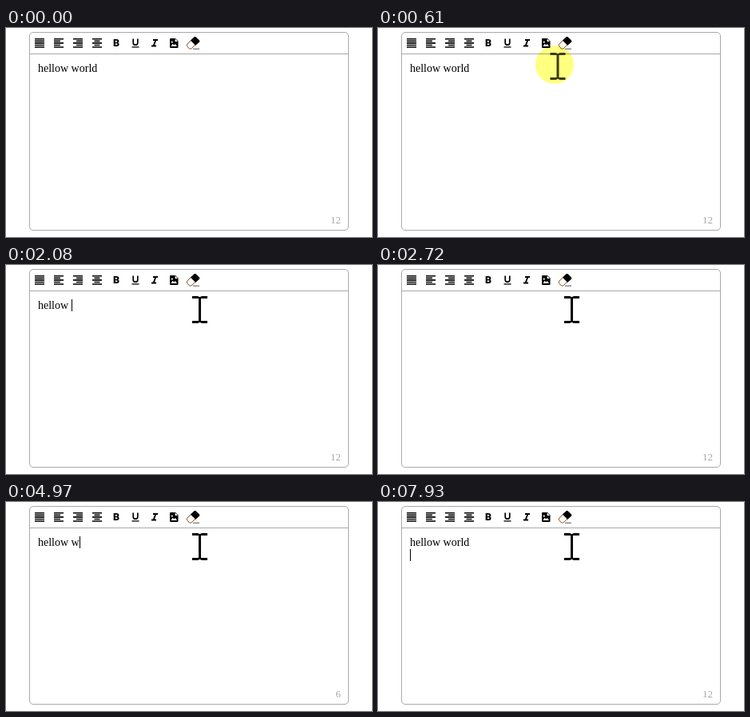
Write an HTML page that moves like this. It is 458 px wide and 262 px high and loops after 8 s.

```html
<!DOCTYPE html>
<html lang="en">
<head>
<meta charset="utf-8">
<title>Text editor</title>
<style>
  html, body { margin: 0; width: 100%; height: 100%; overflow: hidden; background: #fff; }
  svg { display: block; }
  text { white-space: pre; }
  .serif { font-family: "Liberation Serif", "Times New Roman", serif; }
  #highlight { mix-blend-mode: multiply; }
</style>
</head>
<body>
<svg width="458" height="262" viewBox="0 0 458 262">
  <rect x="29.5" y="5.5" width="399" height="248" rx="4.5" fill="#fff" stroke="#a9a9a9"/>
  <path d="M30 32.5H428" stroke="#a9a9a9"/>

  <g id="aligns" stroke="#000" stroke-width="1.6"></g>

  <text x="138" y="23" font-family="Roboto, sans-serif" font-weight="900" font-size="12.5" text-anchor="middle">B</text>
  <g fill="none" stroke="#000">
    <path d="M159.2 13.5V18.4a2.8 2.8 0 0 0 5.6 0V13.5" stroke-width="1.7"/>
    <path d="M157.5 23.9H166.5" stroke-width="1.3"/>
    <path d="M184 15H190M182 22.5H188M187.4 15L184.6 22.5" stroke-width="1.9"/>
  </g>

  <path d="M206 13H212L215.5 16.5V24a1 1 0 0 1-1 1H206a1 1 0 0 1-1-1V14a1 1 0 0 1 1-1Z"/>
  <path d="M211.6 13.6V17H215M206.5 23L208.6 19.8L210.4 21.6L211.8 20L214 23Z" fill="#fff"/>
  <circle cx="207.8" cy="17.6" r="1.1" fill="#fff"/>

  <g stroke-linejoin="round">
    <path d="M231.5 15.5L237 21L231.8 26H229.5L226.5 22.6V20.5Z" fill="#fff" stroke="#8a4a1c"/>
    <path d="M231.3 15.6L235.8 11.6H237.4L241.8 15.8V17.3L237.2 21.3Z" stroke="#000"/>
    <path d="M234 26.2H242" stroke="#555"/>
  </g>

  <text id="line" class="serif" x="40" y="55" font-size="14"></text>
  <rect id="caret" width="1" height="15"/>
  <text id="count" class="serif" x="419" y="245" font-size="13" fill="#a9a9a9" text-anchor="end"></text>

  <path id="cursor" d="M-9.5-17H-2.5L0-15.8L2.5-17H9.5V-14H1.5V14H9.5V17H2.5L0 15.8L-2.5 17H-9.5V14H-1.5V-14H-9.5Z"/>
  <circle id="highlight" r="24" fill="#ffff80"/>
</svg>
<script>
const LOOP = 8000;
const FULL = "hellow world";
const $ = id => document.getElementById(id);

// time, text, counter, caret line (0 = hidden)
const typing = [
  [0, FULL, 12, 0], [700, FULL, 12, 1], [1160, FULL, 12, 0],
  [1540, "hellow worl", 12, 0], [1700, "hellow worl", 12, 1],
  [2000, "hellow wo", 12, 1], [2080, "hellow ", 12, 1], [2160, "hello", 12, 1],
  [2240, "he", 12, 1], [2320, "", 12, 1], [2720, "", 12, 0],
  [2950, "h", 12, 0], [3030, "h", 1, 0], [3100, "he", 2, 0],
  [3250, "hel", 2, 1], [3330, "hel", 3, 1], [3420, "hell", 4, 1],
  [3570, "hello", 5, 1], [3660, "hellow", 6, 1], [3810, "hellow", 6, 0],
  [4360, "hellow o", 6, 0], [4440, "hellow o", 8, 0], [4740, "hellow o", 8, 1],
  [4820, "hellow ", 8, 1], [4890, "hellow ", 6, 1], [4970, "hellow w", 6, 1],
  [5050, "hellow w", 8, 1], [5130, "hellow wo", 9, 1], [5360, "hellow wo", 9, 0],
  [5740, "hellow wor", 9, 0], [5820, "hellow wor", 10, 0],
  [5890, "hellow worl", 10, 0], [5970, "hellow worl", 11, 0],
  [6430, "hellow worl", 11, 1], [6980, "hellow worl", 11, 0],
  [7380, FULL, 11, 0], [7450, FULL, 12, 0], [7930, FULL, 12, 2]
];

// time, pointer centre
const pointer = [
  [70, 349.5, 232], [150, 336, 206], [230, 311, 166], [300, 286, 127],
  [380, 262, 95], [450, 243, 70], [530, 230, 54], [610, 225, 48],
  [700, 226, 48], [770, 231, 51], [840, 236.5, 54], [930, 242.5, 56]
];

const stepAt = (steps, t) => steps.findLast(step => step[0] <= t);
const show = (el, on) => el.setAttribute("visibility", on ? "visible" : "hidden");
const moveTo = (el, x, y) => el.setAttribute("transform", `translate(${x} ${y})`);

function alignIcon(cx, shortWidth, side) {
  let d = "";
  for (let row = 0; row < 5; row++) {
    const width = row % 2 ? shortWidth : 12;
    d += `M${cx - width / 2 + side * (12 - width) / 2} ${13.8 + row * 2.55}h${width}`;
  }
  return `<path d="${d}"/>`;
}
$("aligns").innerHTML =
  alignIcon(42, 12, 0) + alignIcon(66, 8, -1) + alignIcon(90, 8, 1) + alignIcon(114, 7, 0);

function draw(t) {
  const [, text, count, caretLine] = stepAt(typing, t);
  $("line").textContent = text;
  $("count").textContent = count;
  show($("caret"), caretLine);
  const caretX = caretLine === 1 && text ? Math.round(40 + $("line").getComputedTextLength()) : 40;
  moveTo($("caret"), caretX, caretLine === 2 ? 59 : 43);

  const place = stepAt(pointer, t);
  const pressed = t >= 610 && t < 770;
  show($("cursor"), place);
  show($("highlight"), pressed);
  $("cursor").setAttribute("fill", pressed ? "#3c3c1c" : "#000");
  if (place) {
    moveTo($("cursor"), place[1], place[2]);
    moveTo($("highlight"), place[1] - 4, place[2] - 2);
  }
}

const start = performance.now();
function tick() {
  draw((performance.now() - start) % LOOP);
  requestAnimationFrame(tick);
}
tick();
</script>
</body>
</html>
```
